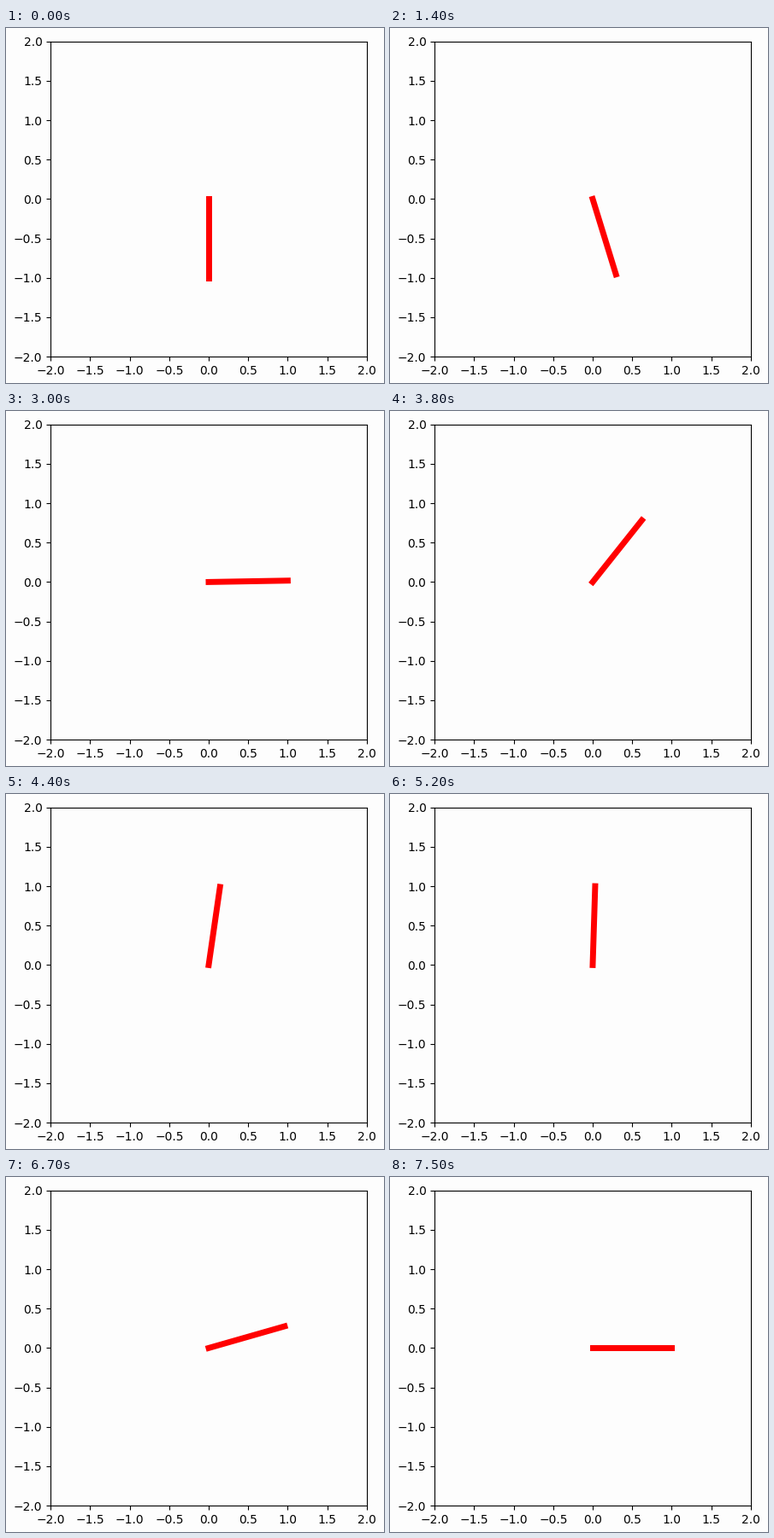
These frames come from a looping animation (442 px wide and 416 px high, 9100 ms). A matplotlib script:

```python
import numpy as np
import matplotlib.pyplot as plt
from matplotlib.animation import FuncAnimation

W, H, DPI = 442, 416, 100
FRAMES, INTERVAL = 91, 100
LEFT, BOTTOM, SIDE = 52.2, 30.8, 369.6
PAPER = "#fdfdfd"

# Swing up slightly past the top, then fall back to horizontal.
STEPS = np.array([4, 14, 24, 34, 49, 73.5])
ANGLES = np.array([0, 17.1, 51, 118, 182, 90])  # degrees from straight down
SPEEDS = np.gradient(ANGLES, STEPS)
SPEEDS[[0, -2, -1]] = 0  # at rest at both ends and at the turn


def swing(n):
    """Cubic Hermite interpolation of the angle at step n."""
    n = np.clip(n, STEPS[0], STEPS[-1])
    i = min(np.searchsorted(STEPS, n, side="right"), len(STEPS) - 1) - 1
    h = STEPS[i + 1] - STEPS[i]
    s = (n - STEPS[i]) / h
    ease = s * s * (3 - 2 * s)
    return (
        ANGLES[i] + (ANGLES[i + 1] - ANGLES[i]) * ease
        + h * s * (1 - s) * (SPEEDS[i] * (1 - s) - SPEEDS[i + 1] * s)
    )


fig = plt.figure(figsize=(W / DPI, H / DPI), dpi=DPI, facecolor=PAPER)
ax = fig.add_axes([LEFT / W, BOTTOM / H, SIDE / W, SIDE / H], facecolor=PAPER)
ax.set(xlim=(-2, 2), ylim=(-2, 2))
ticks = np.arange(-2, 2.1, 0.5)
ax.set_xticks(ticks)
ax.set_yticks(ticks)
(arm,) = ax.plot([], [], color="red", lw=5)


def update(n):
    a = np.radians(swing(n))
    arm.set_data([0, np.sin(a)], [0, -np.cos(a)])
    return (arm,)


anim = FuncAnimation(fig, update, frames=FRAMES, interval=INTERVAL,
                     repeat=True, repeat_delay=0, blit=False)
plt.show()
```
